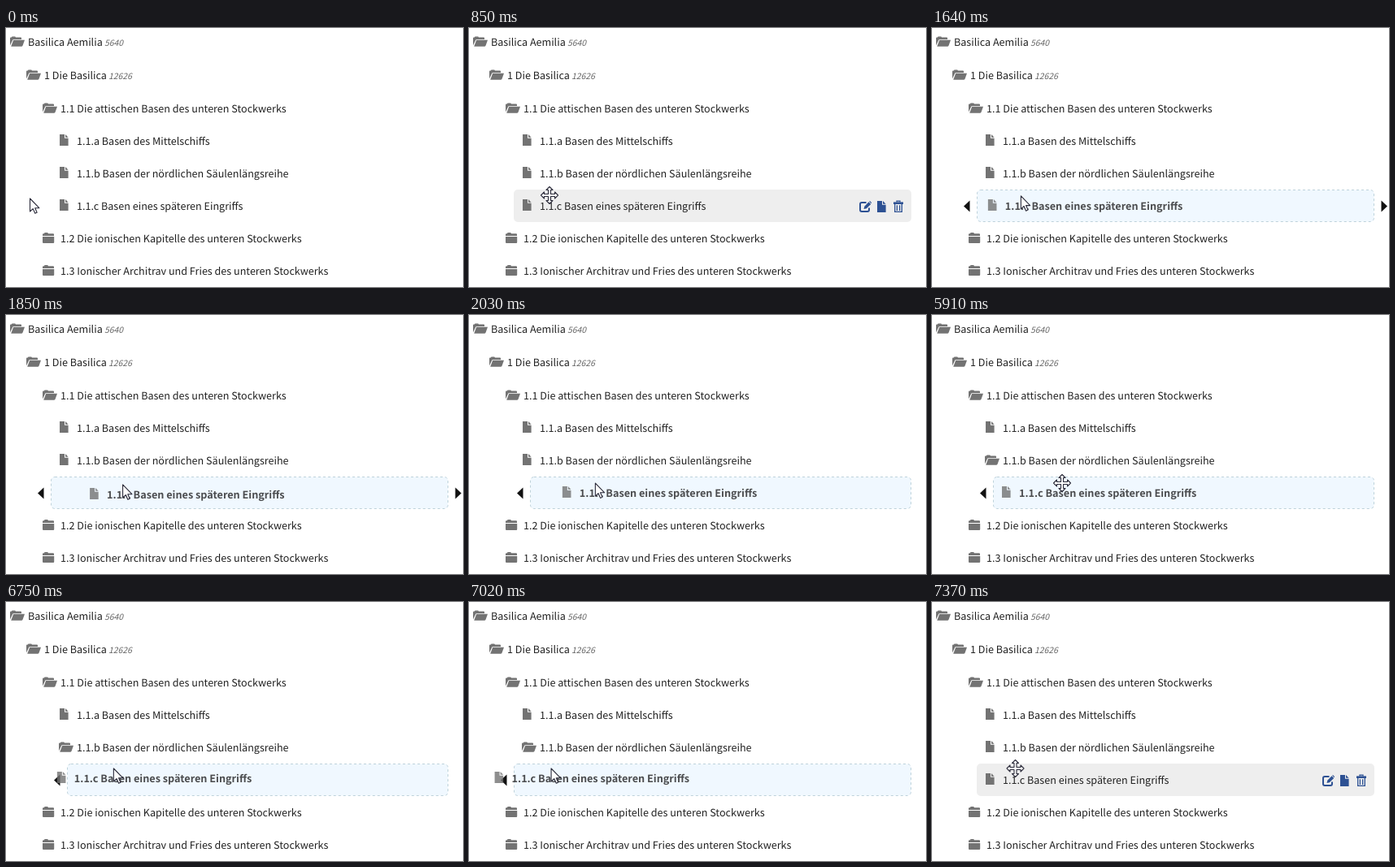
Recreate the animation shown at these times as an HTML page. Size 562 by 319 pixels, loop 8 s.

```html
<!DOCTYPE html>
<html lang="de">
<head>
<meta charset="utf-8">
<title>Gliederung</title>
<style>
  html, body { margin: 0; width: 100%; height: 100%; overflow: hidden; background: #fff; }
  svg { display: block; }
  text {
    font: 12.59px "Noto Sans CJK JP", "Noto Sans CJK SC", "Noto Sans CJK", "Noto Sans", sans-serif;
    fill: #222;
    text-rendering: geometricPrecision;
    white-space: pre;
  }
  .count { font-size: 10.4px; font-style: italic; fill: #666; }
  .icon { fill: #737373; }
  .tool { fill: #2d5193; }
  .tool .line { fill: none; stroke: #2d5193; }
  .drag { opacity: .8; }
  .drag text { font-size: 12.65px; font-weight: 700; }
  .pointer { fill: #fff; stroke: #2b2b3a; stroke-width: 1.1; stroke-linejoin: round; }
</style>
</head>
<body>
<svg id="stage" width="562" height="319" viewBox="0 0 562 319"></svg>
<script>
const NS = "http://www.w3.org/2000/svg";
const stage = document.getElementById("stage");
const LOOP = 8000;

const shapes = {
  open: "M0 11V2Q0 1 1 1H1.8L2.5 0H6.2L7 1H13Q14 1 14 2V3.4H4.6Q3.5 3.4 3.1 4.4Z" +
        "M4.2 4.3H18L15.5 11.2Q15.1 12.2 14 12.2H1.2Z",
  closed: "M0 4V2.2Q0 1.2 1 1.2H1.8L2.6 0H6.2L7 1.2H13Q14 1.2 14 2.2V4Z" +
          "M0 5H14.2V12Q14.2 13 13.2 13H1Q0 13 0 12Z",
  file: "M0 0H6V4.8H10.6V14H0ZM7 0L10.6 3.8H7Z"
};
const iconOffset = { open: [-22, -6.5], closed: [-22, -7], file: [-21, -8] };

function add(parent, tag, attrs = {}, content) {
  const el = document.createElementNS(NS, tag);
  for (const k in attrs) el.setAttribute(k, attrs[k]);
  if (content !== undefined) el.textContent = content;
  parent.appendChild(el);
  return el;
}
const move = (el, x, y) => el.setAttribute("transform", `translate(${x} ${y})`);
const show = (el, on) => el.setAttribute("visibility", on ? "visible" : "hidden");

function addIcon(parent, kind) {
  const [x, y] = iconOffset[kind];
  return add(parent, "path", { class: "icon", d: shapes[kind], transform: `translate(${x} ${y})` });
}
function addRow(x, y, kind, label, cls = "") {
  const g = add(stage, "g", { class: cls });
  move(g, x, y);
  if (kind) addIcon(g, kind);
  add(g, "text", { x: 0, y: 5 }, label);
  return g;
}
function addCount(x, y, value) {
  add(stage, "text", { class: "count", x, y: y + 5 }, value);
}

// Static outline
addRow(27, 17, "open", "Basilica Aemilia");
addCount(121, 17, "5640");
addRow(47, 58, "open", "1 Die Basilica");
addCount(126, 58, "12626");
addRow(67, 99, "open", "1.1 Die attischen Basen des unteren Stockwerks");
addRow(87, 139, "file", "1.1.a Basen des Mittelschiffs");
const sibling = addRow(87, 179, null, "1.1.b Basen der nördlichen Säulenlängsreihe");
const siblingFile = addIcon(sibling, "file");
const siblingOpen = addIcon(sibling, "open");
addRow(67, 259, "closed", "1.2 Die ionischen Kapitelle des unteren Stockwerks");
addRow(67, 299, "closed", "1.3 Ionischer Architrav und Fries des unteren Stockwerks");

// Highlight, drop placeholder and direction hints
const hover = add(stage, "rect", { y: 199, height: 40, rx: 5, fill: "#eee" });
const slot = add(stage, "rect", {
  y: 199.5, height: 39, rx: 4.5, fill: "#f0f8ff", stroke: "#bed2db", "stroke-dasharray": "3 3"
});
const hintLeft = add(stage, "path", { d: "M0 0L7.5 -7V7Z", fill: "#111" });
const hintRight = add(stage, "path", { d: "M560 219.5L552.5 212.5V226.5Z", fill: "#111" });

// The moving row, at rest and while dragged
const label = "1.1.c Basen eines späteren Eingriffs";
const rest = addRow(87, 219, "file", label);
const drag = addRow(87, 219, "file", label, "drag");

// Row tools: edit, new, delete
const tools = add(stage, "g", { class: "tool" });
add(tools, "path", { class: "line", "stroke-width": 2,
  d: "M488.5 215H483Q481 215 481 217V224Q481 226 483 226H490Q492 226 492 224V221.5" });
add(tools, "path", { d: "M485.5 223L486.3 219.8L491.6 214.3L494.2 216.9L488.8 222.2ZM492.2 213.7L493 213L495 215L494.7 216.2Z" });
add(tools, "path", { d: shapes.file, transform: "translate(502 213)" });
add(tools, "path", { class: "line", "stroke-width": 1.3,
  d: "M523.7 217V226.3H532.3V217M526.4 218.2V225M529.6 218.2V225M526 214.5V213.2H530V214.5" });
add(tools, "path", { d: "M522 214.4H534V217H522Z" });

// Pointers
const arrow = add(stage, "path", { class: "pointer",
  d: "M0 0V16L3.7 12.6L6.2 18.3L8.6 17.2L6.2 11.7H11.3Z" });
const arm = [[-4, -6.5], [0, -10.5], [4, -6.5], [1.5, -6.5], [1.5, -1.5], [6.5, -1.5]];
const cross = [];
for (let q = 0, pts = arm; q < 4; q++, pts = pts.map(([x, y]) => [-y, x])) cross.push(...pts);
const mover = add(stage, "path", { class: "pointer", d: "M" + cross.join("L") + "Z" });

// Pointer path: time, x, y, easing towards that point
const easeIn = u => u ** 1.4;
const easeOut = u => 1 - (1 - u) ** 1.5;
const path = [
  [0, 29.5, 210], [500, 29.5, 210],
  [690, 66, 203.5, easeIn], [850, 95, 206, easeOut],
  [1490, 95, 206], [1850, 143.5, 209, easeIn], [2060, 156, 207, easeOut],
  [6290, 156, 207], [6750, 132.5, 205, easeIn], [7080, 98.5, 205, easeOut],
  [8000, 98.5, 205]
];
function pointerAt(t) {
  const i = Math.max(1, path.findIndex(p => p[0] > t));
  const [t0, x0, y0] = path[i - 1];
  const [t1, x1, y1, ease = u => u] = path[i];
  const u = ease((t - t0) / (t1 - t0));
  return [x0 + (x1 - x0) * u, y0 + (y1 - y0) * u];
}

function draw(t) {
  const [px, py] = pointerAt(t);
  const firstDrag = t >= 1510 && t < 2260;
  const secondDrag = t >= 5910 && t < 7340;
  const dragging = firstDrag || secondDrag;
  const settling = (t >= 2260 && t < 2290) || (t >= 7340 && t < 7370);
  const nested = firstDrag ? px > 150 : secondDrag ? px > 122 : t >= 2260 && t < 7340;
  const left = nested ? 75 : 55;
  const hovered = !dragging && !settling && px >= 55;

  const parent = t >= 2260 && t < 7340;
  show(siblingFile, !parent);
  show(siblingOpen, parent);

  hover.setAttribute("x", left);
  hover.setAttribute("width", 544 - left);
  show(hover, hovered);
  show(tools, hovered);
  slot.setAttribute("x", left + .5);
  slot.setAttribute("width", 543 - left);
  show(slot, dragging);
  move(hintLeft, left - 16, 219.5);
  show(hintLeft, dragging);
  show(hintRight, firstDrag && !nested);

  move(rest, left + 32, 219);
  show(rest, !dragging);
  show(drag, dragging);
  if (firstDrag) move(drag, 87 + Math.max(0, px - 106.5), 219 + Math.max(0, py - 207));
  if (secondDrag) move(drag, 107 + px - 155.5, 219 + py - 207);
  if (secondDrag && t < 6310) move(drag, 107, 219);

  const crossed = hovered || (secondDrag && t < 6310);
  move(arrow, px, py);
  move(mover, px + 4, py);
  show(arrow, !crossed);
  show(mover, crossed);
}

const start = performance.now();
function tick() {
  draw((performance.now() - start) % LOOP);
  requestAnimationFrame(tick);
}
draw(0);
requestAnimationFrame(tick);
</script>
</body>
</html>
```
